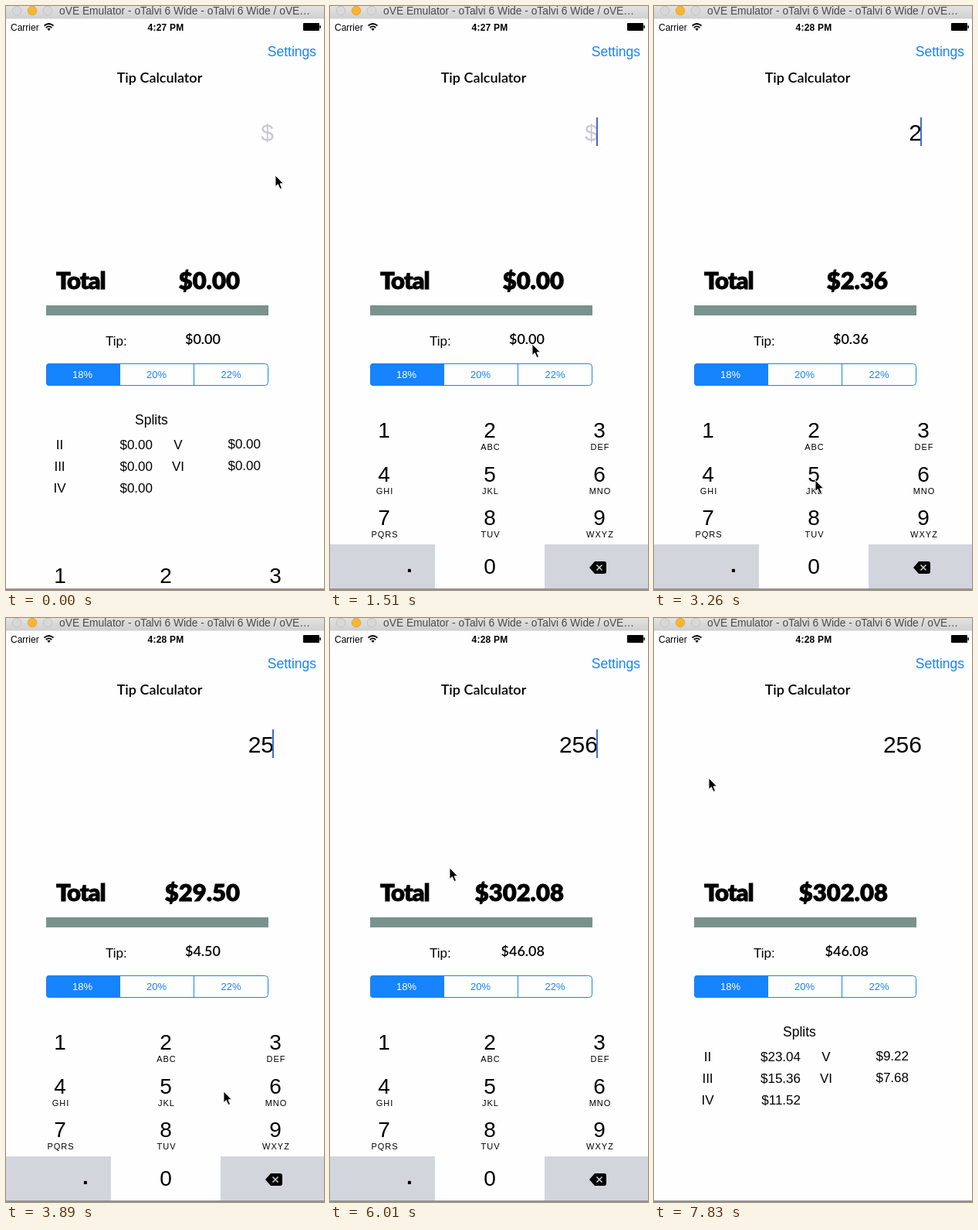
Recreate the animation shown at these times as an HTML page. Size 412 by 755 pixels, loop 8 s.

```html
<!DOCTYPE html>
<html lang="en">
<head>
<meta charset="utf-8">
<title>Tip Calculator</title>
<style>
  html, body { margin: 0; width: 100%; height: 100%; overflow: hidden; background: #fff; }
  svg { display: block; width: 412px; height: 755px; font: 17px "Liberation Sans", Arial, sans-serif; }
  .geo { font: 600 18px Lato, sans-serif; }
  .heavy { font: 900 31px Lato, sans-serif; stroke: #000; stroke-width: .8px; }
  .end { text-anchor: end; }
  .mid, #keys { text-anchor: middle; }
  .blue { fill: #1684fc; }
  .seg { font-size: 13px; }
  .digit { font-size: 28px; }
  .letters { font-size: 11px; letter-spacing: 1px; }
  .gray { fill: #d2d5db; }
</style>
</head>
<body>
<svg viewBox="0 0 412 755">
  <defs>
    <linearGradient id="chrome" x2="0" y2="1">
      <stop stop-color="#e2e2e2"/><stop offset="1" stop-color="#d0d0d0"/>
    </linearGradient>
  </defs>
  <rect width="412" height="755" fill="#fefefe"/>

  <rect width="412" height="16.5" fill="url(#chrome)"/>
  <g stroke-width=".8">
    <circle cx="14" cy="6" r="5.8" fill="#d8d8d8" stroke="#bdbdbd"/>
    <circle cx="34" cy="6" r="5.8" fill="#f8b52e" stroke="#dda033"/>
    <circle cx="54" cy="6" r="5.8" fill="#d8d8d8" stroke="#bdbdbd"/>
  </g>
  <text x="69" y="11" font-size="13.8" fill="#4b4b4b">oVE Emulator - oTalvi 6 Wide - oTalvi 6 Wide / oVE…</text>

  <text x="6" y="32" font-size="12">Carrier</text>
  <g fill="none" stroke="#000" stroke-width="1.7">
    <path d="M49.5 25.5Q55.5 20.5 61.5 25.5M51.7 28Q55.500 24.8 59.3 28"/>
    <path d="M55.5 32L53.3 29.5Q55.5 28 57.7 29.5Z" fill="#000" stroke="none"/>
  </g>
  <text id="clock" class="mid" x="207" y="32" font-size="12" font-weight="bold" letter-spacing=".2"></text>
  <rect x="385" y="22" width="21" height="10" rx="1"/>
  <rect x="406.5" y="25" width="1.5" height="4" rx=".7"/>

  <text class="blue end" x="402" y="65" font-size="17.5">Settings</text>
  <text class="geo mid" x="199" y="99">Tip Calculator</text>
  <text id="amount" class="end" x="347" y="174" font-size="30"></text>
  <rect id="caret" x="345" y="144" width="2" height="37" fill="#426bd0"/>

  <text class="heavy" x="65" y="366" letter-spacing="-1.1">Total</text>
  <text id="total" class="heavy end" x="303" y="366"></text>
  <rect x="52" y="387" width="288" height="13" fill="#78938b"/>
  <text x="129" y="439">Tip:</text>
  <text id="tip" class="geo end" x="278" y="437"></text>

  <path class="blue" d="M148 462H56q-4 0-4 4v21q0 4 4 4H148z"/>
  <path d="M243.5 462.5v28" stroke="#1684fc"/>
  <rect x="52.5" y="462.5" width="287" height="28" rx="4" fill="none" stroke="#1684fc"/>
  <g class="seg mid">
    <text x="99" y="481" fill="#fff">18%</text>
    <text class="blue" x="195" y="481">20%</text>
    <text class="blue" x="291.5" y="481">22%</text>
  </g>

  <text x="167" y="541" font-size="17.5">Splits</text>
  <g id="splits"></g>
  <g id="keys"></g>
  <rect y="753" width="412" height="2" fill="#929292"/>
  <path id="pointer" d="M0 0V14.5L3.3 11.5L6 17.5L8.5 16.5L6 10.7H10.5Z" stroke="#fff" stroke-width=".9"/>
</svg>
<script>
const LOOP = 8000, RATE = 0.18;
const FOCUS = 1510, KEYS_UP = 510, KEYS_DOWN = 7830, NEW_MINUTE = 1960;
const $ = id => document.getElementById(id);
const money = value => "$" + value.toFixed(2);

$("splits").innerHTML = ["II", "III", "IV", "V", "VI"].map((name, i) => {
  const right = i > 2, y = 573 + 28 * (i % 3);
  return `<text class="mid" x="${right ? 223 : 69.5}" y="${y}">${name}</text>` +
    `<text class="end value" x="${right ? 330 : 190}" y="${right ? y - 1 : y}"></text>`;
}).join("");
const splitValues = document.querySelectorAll(".value");

const edges = [0, 136, 278, 412], centers = [70, 207, 349];
const cell = (col, row, id = "") =>
  `<rect class="gray" id="${id}" x="${edges[col]}" y="${528 + row * 56}" width="${edges[col + 1] - edges[col]}" height="57"/>`;
$("keys").innerHTML = '<rect y="520" width="412" height="235" fill="#fefefe"/>' +
  ["", "ABC", "DEF", "GHI", "JKL", "MNO", "PQRS", "TUV", "WXYZ"].map((label, i) => {
    const col = i % 3, row = Math.floor(i / 3), y = 558 + row * 56.5;
    return cell(col, row, "key" + (i + 1)) +
      `<text class="digit" x="${centers[col]}" y="${y}">${i + 1}</text>` +
      `<text class="letters" x="${centers[col] + 1}" y="${y + 16}">${label}</text>`;
  }).join("") +
  cell(0, 3) + cell(2, 3) +
  `<text class="digit" x="103" y="732" font-weight="bold">.</text>
   <text class="digit" x="207" y="734">0</text>
   <path d="M336 726L343 718H355q3 0 3 3v10q0 3-3 3H343z"/>
   <path d="M345.5 722.5l7 7m0-7l-7 7" stroke="#d2d5db" stroke-width="1.5"/>`;

const presses = [
  { digit: 2, down: 2510, up: 2660 },
  { digit: 5, down: 3410, up: 3740 },
  { digit: 6, down: 4640, up: 5420 },
];
// pointer moves: start, end, x, y
const moves = [
  [0, 150, 331, 214], [510, 1100, 262, 437], [1510, 2510, 206, 558], [2660, 3260, 209, 613],
  [3740, 4360, 333, 612], [4640, 5570, 320, 553], [5720, 6640, 71, 207],
];

const clamp = v => Math.min(1, Math.max(0, v));
const easeOut = v => 1 - (1 - v) ** 3;

function pointerAt(t) {
  const shown = Math.floor((t + 10) / 150) * 150;
  let x = 349, y = 219;
  for (const [start, end, toX, toY] of moves) {
    const k = easeOut(clamp((shown - start) / (end - start)));
    x += (toX - x) * k;
    y += (toY - y) * k;
  }
  return [Math.round(x), Math.round(y)];
}

// The caret stays on after each key, then blinks
function caretVisible(t, typed) {
  const since = typed.length ? typed.at(-1).down : FOCUS;
  return t >= FOCUS && t < KEYS_DOWN && (t - since) % 1200 < 900;
}

function draw(t) {
  const typed = presses.filter(p => t >= p.down);
  const amount = typed.map(p => p.digit).join("");
  const bill = Number(amount), tip = bill * RATE;
  $("clock").textContent = t < NEW_MINUTE ? "4:27 PM" : "4:28 PM";
  $("amount").textContent = amount || "$";
  $("amount").setAttribute("fill", amount ? "#000" : "#c7c7cd");
  $("total").textContent = money(bill + tip);
  $("tip").textContent = money(tip);
  splitValues.forEach((el, i) => el.textContent = money(tip / (i + 2)));
  $("caret").style.opacity = caretVisible(t, typed) ? 1 : 0;
  $("keys").setAttribute("transform", `translate(0 ${t < KEYS_UP ? 188 : t < KEYS_DOWN ? 0 : 260})`);
  for (let n = 1; n <= 9; n++) {
    const held = presses.some(p => p.digit === n && t >= p.down && t < p.up);
    $("key" + n).style.opacity = held ? 1 : 0;
  }
  $("pointer").setAttribute("transform", `translate(${pointerAt(t)})`);
}

function tick() {
  draw(performance.now() % LOOP);
  requestAnimationFrame(tick);
}
tick();
</script>
</body>
</html>
```
